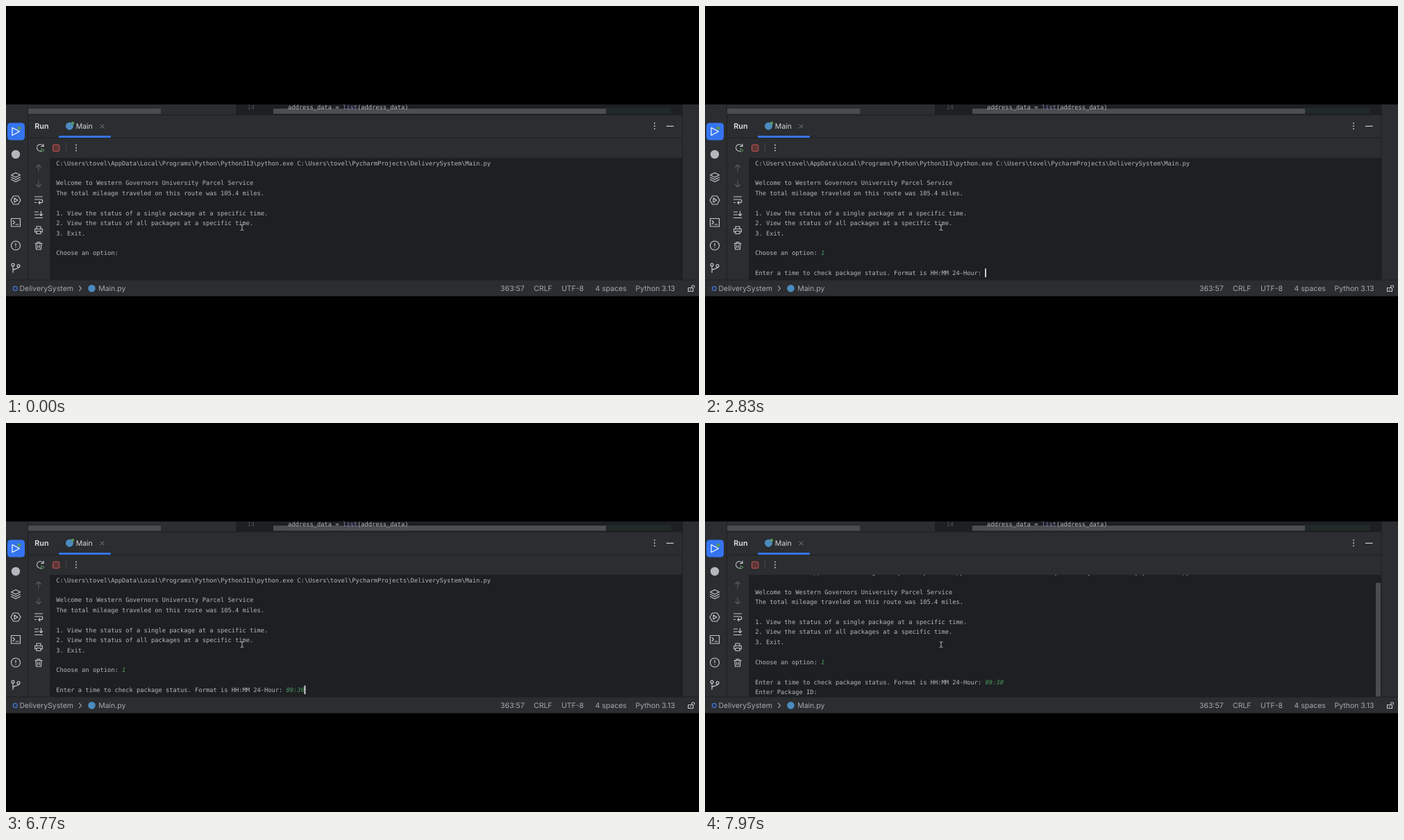
Recreate the animation shown at these times as an HTML page. Size 998x561 px, loop 8 s.

```html
<!DOCTYPE html>
<html lang="en">
<head>
<meta charset="utf-8">
<title>Run console</title>
<style>
  html, body { margin: 0; width: 100%; height: 100%; overflow: hidden; background: #000; }
  svg { display: block; width: 998px; height: 561px; }
  text { font: 10.5px Inter, sans-serif; fill: #a6a9b0; white-space: pre; text-rendering: geometricPrecision; }
  .mono { font: 8.74px "DejaVu Sans Mono", monospace; fill: #b6b8bd; }
  .typed { font-style: italic; fill: #4c9d63; }
  .icon { fill: none; stroke: #c6c8ce; stroke-width: 1.15; stroke-linecap: round; stroke-linejoin: round; }
  .dim { stroke: #585b61; }
  .panel { fill: #2b2d30; }
  .editor { fill: #1e1f22; }
  .rule { stroke: #1e1f22; stroke-width: 1; }
</style>
</head>
<body>
<svg viewBox="0 0 998 561">
  <defs>
    <clipPath id="console"><rect x="63" y="219" width="911" height="176"/></clipPath>
    <clipPath id="window"><rect y="142" width="998" height="276.5"/></clipPath>
  </defs>
  <rect width="998" height="561"/>
  <g clip-path="url(#window)">
    <rect class="panel" y="142" width="998" height="277"/>

    <!-- Editor strip -->
    <rect class="editor" x="331" y="142" width="643" height="15"/>
    <rect x="32" y="148" width="191" height="7.5" fill="#4b4c4f"/>
    <rect x="864" y="147" width="94" height="8" fill="#202a26"/>
    <rect x="385" y="148" width="479" height="7.5" fill="#4d4e51"/>
    <text class="mono" x="347.5" y="149.4" style="fill:#4b5059">14</text>
    <text class="mono" x="406" y="149.4">address_data = <tspan fill="#8888c6">list</tspan>(address_data)</text>

    <!-- Console -->
    <rect class="editor" x="63" y="219" width="911" height="176"/>
    <g clip-path="url(#console)">
      <g id="output"></g>
      <rect id="scrollbar" x="966" y="230.5" width="7" height="165" fill="#4b4c4f"/>
    </g>
    <path class="rule" d="M31.5 142V395M974 142V395M32 157H974M32 190H974M0 395H998"/>

    <!-- Header and toolbar -->
    <text x="41.3" y="177" style="font-size:10.8px;font-weight:600;fill:#dfe1e5">Run</text>
    <circle cx="91.5" cy="173.2" r="5.5" fill="#4b8bbe"/>
    <circle cx="96" cy="169" r="2.2" fill="#57965c"/>
    <text x="100.7" y="177" style="fill:#d4d6db">Main</text>
    <path class="icon" style="stroke:#85888f;stroke-width:.9" d="M136 171l5 5m0-5l-5 5"/>
    <rect x="76" y="187" width="75" height="3" rx="1.2" fill="#3574f0"/>
    <g fill="#c6c8ce">
      <path d="M951 172.7h10.5v1.2h-10.5z"/>
      <g id="menus"></g>
    </g>
    <path class="icon" d="M53.5 202a4.8 4.8 0 1 0-2 6.8M54 199v3.5h-3.5"/>
    <path d="M51 205.5l4.3 2.7-4.3 2.7z" fill="#2b2d30" stroke="#57965c"/>
    <rect x="67.5" y="200" width="9.4" height="9.4" rx="1.4" fill="#5e3538" stroke="#c75450"/>
    <path d="M86.5 197v14" stroke="#43454a"/>

    <!-- Console gutter -->
    <g class="icon">
      <path class="dim" d="M47 238v-9m-3.5 3.5l3.5-3.5 3.5 3.5M47 252v9m-3.5-3.5l3.5 3.5 3.5-3.5"/>
      <path d="M41.5 275h11M41.5 279h9a2.3 2.3 0 0 1 0 4.6H47m1.8-2L46.8 283.600l2 2M41.500 283.500h2"/>
      <path d="M41.500 297h5M41.500 301h5M41.500 305.500h11M50.500 296v6.500m-2.300-2.300l2.300 2.300 2.300-2.300"/>
      <path d="M44 321.500v-3.500h6v3.500M44 326h-2.300v-4.500h10.600v4.500H50M44 324.500h6v4h-6z"/>
      <path d="M42 342.500h10M45 342.500v-2h4v2M43 342.500l.6 8.500h6.800l.6-8.500M45.700 345v3.500m2.600-3.500v3.500"/>
    </g>

    <!-- Tool window bar -->
    <rect x="2" y="168.500" width="25" height="25" rx="4.500" fill="#3574f0"/>
    <path class="icon" style="stroke:#fff" d="M9 175.500v11l10.500-5.500z"/>
    <circle cx="19" cy="176" r="2.600" fill="#57965c"/>
    <circle cx="14" cy="214" r="6.200" fill="#b4b7bd"/>
    <g class="icon">
      <path d="M14 240.500l6.500 3.300-6.500 3.300-6.500-3.300zM7.500 247l6.500 3.300 6.500-3.300M7.500 250.200l6.500 3.300 6.500-3.300"/>
      <path d="M10.500 274h7l3.500 6-3.500 6h-7L7 280zM12 277v6l5-3z"/>
      <path d="M7.500 306.500h13v11.500h-13zM10 309.500l2.500 2.500-2.500 2.500M14 315h4"/>
      <circle cx="14" cy="345.500" r="6.500"/>
      <path d="M14 342v4M14 348.600v.1"/>
      <circle cx="10" cy="373.300" r="2"/>
      <circle cx="18" cy="374.800" r="2"/>
      <path d="M10 375.300v9M18 376.800c0 3-8 1.700-8 5"/>
    </g>

    <!-- Status bar -->
    <rect x="10.500" y="404.700" width="5.500" height="5.500" rx="1" fill="#25324d" stroke="#548af7"/>
    <path class="icon" style="stroke:#9a9da4" d="M105.500 404l3 3.300-3 3.300"/>
    <circle cx="123.500" cy="407.200" r="5.300" fill="#4b8bbe"/>
    <g id="status"></g>
    <path class="icon" d="M982.500 406.500h7v5h-7zM987.500 406.500v-1.500a2 2 0 0 1 4 0v.6M986 408.500v1"/>

    <!-- Mouse pointer -->
    <path class="icon" style="stroke-width:.9" d="M338 315.500q2 0 2 1.200q0-1.200 2-1.200M340 316.500v6M338 323.500q2 0 2-1.200q0 1.200 2 1.200"/>
  </g>
</svg>
<script>
const LOOP = 8000, LEFT = 72.3, CHAR = 5.262, FIRST = 229.6, LEADING = 14.42, SCROLL = 11.7;
const $ = id => document.getElementById(id);

function add(parent, tag, attrs, content = '') {
  const el = document.createElementNS('http://www.w3.org/2000/svg', tag);
  for (const name in attrs) el.setAttribute(name, attrs[name]);
  el.textContent = content;
  return parent.appendChild(el);
}

for (const x of [101, 934])
  for (const dy of [-4, 0, 4])
    add($('menus'), 'circle', { cx: x, cy: (x < 500 ? 204.5 : 173) + dy, r: 0.95 });

[[19.5, 'DeliverySystem'], [133.2, 'Main.py'], [712, '363:57'], [760, 'CRLF'],
 [800, 'UTF-8'], [848.5, '4 spaces'], [906.5, 'Python 3.13']]
  .forEach(([x, label]) => add($('status'), 'text', { x, y: 411 }, label));

const home = 'C:\\Users\\tovel\\';
const fixedLines = {
  0: home + 'AppData\\Local\\Programs\\Python\\Python313\\python.exe ' + home + 'PycharmProjects\\DeliverySystem\\Main.py',
  2: 'Welcome to Western Governors University Parcel Service',
  3: 'The total mileage traveled on this route was 105.4 miles.',
  5: '1. View the status of a single package at a specific time.',
  6: '2. View the status of all packages at a specific time.',
  7: '3. Exit.'
};
const line = (row, label) =>
  add($('output'), 'text', { class: 'mono', x: LEFT, y: FIRST + row * LEADING }, label);
for (const row in fixedLines) line(+row, fixedLines[row]);

const prompts = [
  [9, 'Choose an option: '],
  [11, 'Enter a time to check package status. Format is HH:MM 24-Hour: '],
  [12, 'Enter Package ID: ']
].map(([row, label]) => {
  const el = line(row, label);
  return { row, label, el, input: add(el, 'tspan', { class: 'typed' }) };
});
const caret = add($('output'), 'rect', { width: 1.8, height: 12.5, fill: '#dfe1e5' });

// start in ms, answers so far (the last one is being typed), caret visible
const steps = [
  [0, [''], false],
  [300, [''], true],
  [1300, [''], false],
  [1455, ['1'], false],
  [1500, ['1'], true],
  [2450, ['1', ''], true],
  [3450, ['1', ''], false],
  [4450, ['1', ''], true],
  [5250, ['1', '0'], true],
  [5600, ['1', '09'], true],
  [6020, ['1', '09:'], true],
  [6400, ['1', '09:3'], true],
  [6750, ['1', '09:30'], true],
  [6980, ['1', '09:30', ''], true],
  [7950, ['1', '09:30', ''], false]
];

function show([, answers, caretOn]) {
  prompts.forEach(({ el, input }, i) => {
    el.style.display = i < answers.length ? '' : 'none';
    input.textContent = answers[i] || '';
  });
  const active = answers.length - 1;
  const { row, label } = prompts[active];
  caret.setAttribute('x', LEFT + (label.length + answers[active].length) * CHAR - 0.6);
  caret.setAttribute('y', FIRST + row * LEADING - 9.6);
  caret.style.display = caretOn ? '' : 'none';
  const scrolled = active === 2;
  $('output').setAttribute('transform', `translate(0 ${scrolled ? -SCROLL : 0})`);
  $('scrollbar').style.display = scrolled ? '' : 'none';
}

const start = performance.now();
let current;
function tick() {
  const t = (performance.now() - start) % LOOP;
  const step = steps.findLast(([at]) => at <= t);
  if (step !== current) show(current = step);
  requestAnimationFrame(tick);
}
tick();
</script>
</body>
</html>
```
